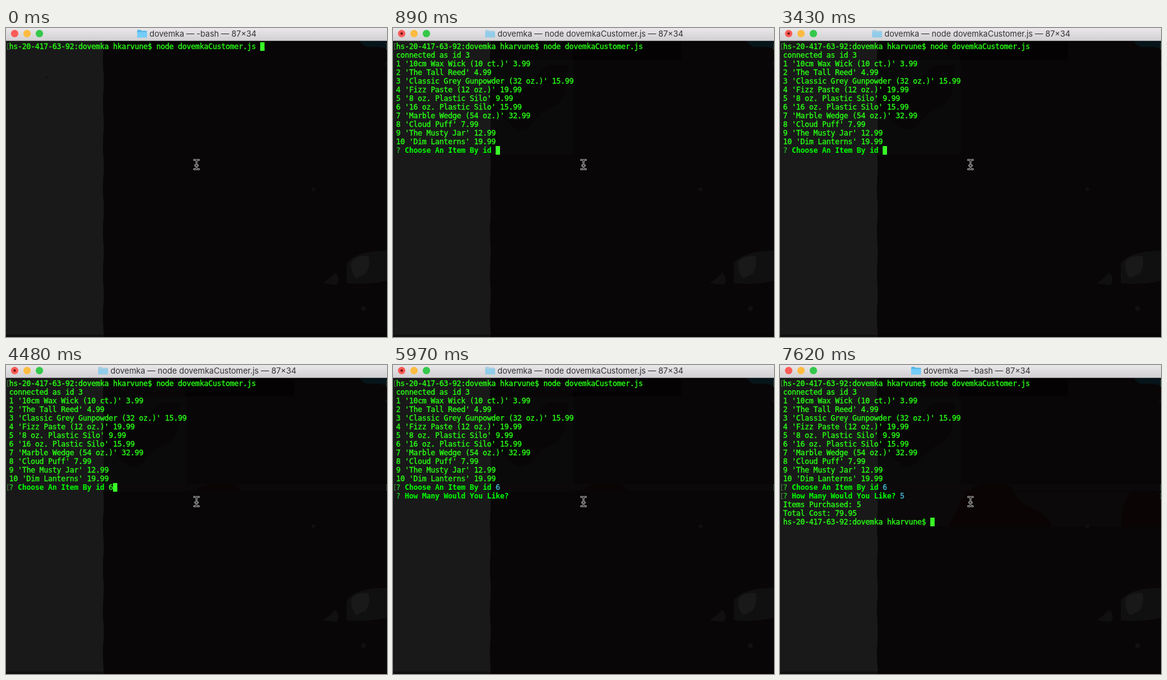
An HTML page with a canvas for the animation above (8000 ms loop, 616 by 500 pixels).

```html
<!DOCTYPE html>
<html lang="en">
<head>
<meta charset="utf-8">
<title>Terminal</title>
<style>
  html, body { margin: 0; width: 100%; height: 100%; overflow: hidden; background: #080607; }
  canvas { display: block; }
</style>
</head>
<body>
<canvas id="stage" width="616" height="500"></canvas>
<script>
const ctx = document.getElementById('stage').getContext('2d');
const LOOP = 8000;
const CELL = 7, LINE = 14, LEFT = 5, TOP = 23;
const MONO = '12px "DejaVu Sans Mono", "Liberation Mono", monospace';
const GREEN = '#28fe14', BOLD = '#00ff00', MARK = '#25bc24', CYAN = '#42b9d2', CURSOR = '#38fe27';

const APP = 'dovemka';
const SCRIPT = APP + 'Customer.js';
const PROMPT = 'hs-20-417-63-92:' + APP + ' hkarvune$ ';
const COMMAND = PROMPT.replace('hs-20', 'hs-2') && PROMPT + 'node ' + SCRIPT;
const LISTING = [
  'connected as id 3',
  "1 '10cm Wax Wick (10 ct.)' 3.99",
  "2 'The Tall Reed' 4.99",
  "3 'Classic Grey Gunpowder (32 oz.)' 15.99",
  "4 'Fizz Paste (12 oz.)' 19.99",
  "5 '8 oz. Plastic Silo' 9.99",
  "6 '16 oz. Plastic Silo' 15.99",
  "7 'Marble Wedge (54 oz.)' 32.99",
  "8 'Cloud Puff' 7.99",
  "9 'The Musty Jar' 12.99",
  "10 'Dim Lanterns' 19.99"
];

// Times at which the session moves on
const T = { run: 600, list: 890, typeId: 4180, enterId: 4480, askCount: 4630, typeCount: 7170, done: 7470, exit: 7620 };
const CURSOR_OFF = [[1940, 2540], [2990, 3430], [4030, 4180], [5970, 6420], [7020, 7170]];

function rect(x, y, w, h, color) {
  ctx.fillStyle = color;
  ctx.fillRect(x, y, w, h);
}

function disc(x, y, r, color) {
  ctx.fillStyle = color;
  ctx.beginPath();
  ctx.arc(x, y, r, 0, Math.PI * 2);
  ctx.fill();
}

function shape(d, color) {
  ctx.fillStyle = color;
  ctx.fill(new Path2D(d));
}

// Text on the cell grid, with a hairline stroke for the heavier screen weight
function print(row, col, text, color = GREEN, bold = false) {
  const x = LEFT + col * CELL, y = TOP + row * LINE + 11;
  ctx.font = (bold ? 'bold ' : '') + MONO;
  ctx.letterSpacing = '0px';
  ctx.letterSpacing = CELL - ctx.measureText('0').width + 'px';
  ctx.fillStyle = ctx.strokeStyle = color;
  ctx.lineWidth = 0.35;
  ctx.fillText(text, x, y);
  if (!bold) ctx.strokeText(text, x, y);
  ctx.letterSpacing = '0px';
}

function block(row, col) {
  rect(LEFT + col * CELL, TOP + row * LINE, CELL, LINE, CURSOR);
}

function brackets(row) {
  const y = TOP + row * LINE + 2;
  const left = '#3f7a3a', right = '#26402a';
  rect(2, y, 1, 10, left);
  rect(2, y, 3, 1, left);
  rect(2, y + 9, 3, 1, left);
  rect(615, y, 1, 10, right);
  rect(614, y, 1, 1, right);
  rect(614, y + 9, 1, 1, right);
}

function backdrop(t) {
  rect(0, 0, 616, 500, '#080607');
  shape('M572 21H616V33Q600 29 586 31Q577 30 572 21Z', '#07141a');
  if (t >= T.run) rect(290, 23, 176, 28, '#040203');
  if (t >= T.list) {
    rect(157, 51, 135, 154, '#0b0a0b');
    shape('M157 92Q172 84 180 100Q200 112 222 90Q240 66 252 60H282Q284 108 264 126Q240 132 222 158Q204 172 190 156L157 128Z', '#080607');
  }
  if (t >= T.enterId) {
    rect(157, 193, 459, 10, '#0b090a');
    shape('M308 203Q316 193 330 193H366Q376 196 378 203Z', '#0a0404');
  }
  if (t >= T.done) {
    rect(157, 205, 459, 56, '#0b090a');
    shape('M300 205H376Q392 226 420 238Q436 248 440 261H272Q288 230 300 205Z', '#0a0404');
    shape('M566 205H616V261H552Q552 226 566 205Z', '#0a0404');
  }

  // Pale strip with an uneven edge
  ctx.fillStyle = '#191919';
  ctx.beginPath();
  ctx.moveTo(0, 21);
  for (let y = 21; y <= 500; y += 6) ctx.lineTo(157.4 + Math.sin(y / 11) * 0.7, y);
  ctx.lineTo(158, 500);
  ctx.lineTo(0, 500);
  ctx.fill();
  disc(66, 80, 2, '#131313');

  shape('M551 380Q564 366 590 362L616 360V409Q588 416 551 413Z', '#111011');
  shape('M558 379Q566 367 586 369Q590 384 582 397L566 405Q557 396 558 379Z', '#1a191a');
  shape('M512 413Q524 405 532 396Q538 400 538 409L535 416Z', '#111011');
  disc(497, 261, 3, '#111011');
  disc(578, 454, 4, '#111011');
  disc(616, 58, 3, '#111011');
  rect(0, 496, 616, 4, 'rgba(10,4,5,.45)');
}

function folder(x, pale) {
  ctx.globalAlpha = pale ? 0.4 : 1;
  shape(`M${x} 4.5Q${x} 3 ${x + 1.5} 3H${x + 5.5}L${x + 7} 4.5H${x + 14.5}Q${x + 16} 4.5 ${x + 16} 6V15H${x}Z`, '#52b5e6');
  rect(x, 6.5, 16, 9, '#74cdf8');
  ctx.globalAlpha = 1;
}

function titleBar(t) {
  const running = t >= T.run && t < T.exit;
  const shade = ctx.createLinearGradient(0, 0, 0, 20);
  shade.addColorStop(0, '#e9e7e9');
  shade.addColorStop(1, '#d2d0d2');
  rect(0, 0, 616, 20, shade);
  rect(0, 20, 616, 1, '#a9a7a9');

  ['#fc5b57', '#fdbc40', '#34c84a'].forEach((color, i) => disc(14 + i * 20, 9, 6, color));
  if (running) disc(14, 9, 2, '#6e0d0a');

  const job = running ? 'node ' + SCRIPT : '-bash';
  const text = `${APP} — ${job} — 87×34`;
  ctx.font = '13px Inter, Roboto, sans-serif';
  const x = Math.round(308.8 - (ctx.measureText(text).width + 20) / 2);
  folder(x, running);
  ctx.fillStyle = '#333133';
  ctx.fillText(text, x + 20, 14);
}

function question(row, text, answer, settled) {
  print(row, 0, '?', MARK);
  print(row, 2, text, BOLD, true);
  print(row, text.length + 3, answer, settled ? CYAN : GREEN);
}

function cursorCell(t) {
  if (t < T.run) return [0, 58];
  if (t < T.list) return [1, 0];
  if (t < T.typeId) return [12, 23];
  if (t < T.askCount) return [12, 24];
  if (t < T.typeCount) return [13, 27];
  if (t < T.done) return [13, 28];
  return [16, 34];
}

function session(t) {
  brackets(0);
  print(0, 0, COMMAND);
  if (t >= T.list) {
    LISTING.forEach((line, i) => print(i + 1, 0, line));
    question(12, 'Choose An Item By id', t >= T.typeId ? '6' : '', t >= T.askCount);
  }
  if (t >= T.enterId) brackets(12);
  if (t >= T.askCount) {
    question(13, 'How Many Would You Like?', t >= T.typeCount ? '5' : '', t >= T.done);
  }
  if (t >= T.done) {
    brackets(13);
    print(14, 0, 'Items Purchased: 5');
    print(15, 0, 'Total Cost: 79.95');
    print(16, 0, PROMPT);
  }
  if (!CURSOR_OFF.some(([from, to]) => t >= from && t < to)) block(...cursorCell(t));
}

function pointer() {
  const beam = new Path2D('M304.5 213.5H306Q308 213.5 308 216V226Q308 228.5 306 228.5H304.5M311.5 213.5H310Q308 213.5 308 216M308 226Q308 228.5 310 228.5H311.5M306 222.5H310');
  ctx.lineCap = 'square';
  ctx.strokeStyle = '#e4e4e4';
  ctx.lineWidth = 2.7;
  ctx.stroke(beam);
  ctx.strokeStyle = '#0a0a0a';
  ctx.lineWidth = 1.1;
  ctx.stroke(beam);
}

function draw(t) {
  backdrop(t);
  titleBar(t);
  session(t);
  pointer();
}

const start = performance.now();
function tick() {
  draw((performance.now() - start) % LOOP);
  requestAnimationFrame(tick);
}
tick();
</script>
</body>
</html>
```
